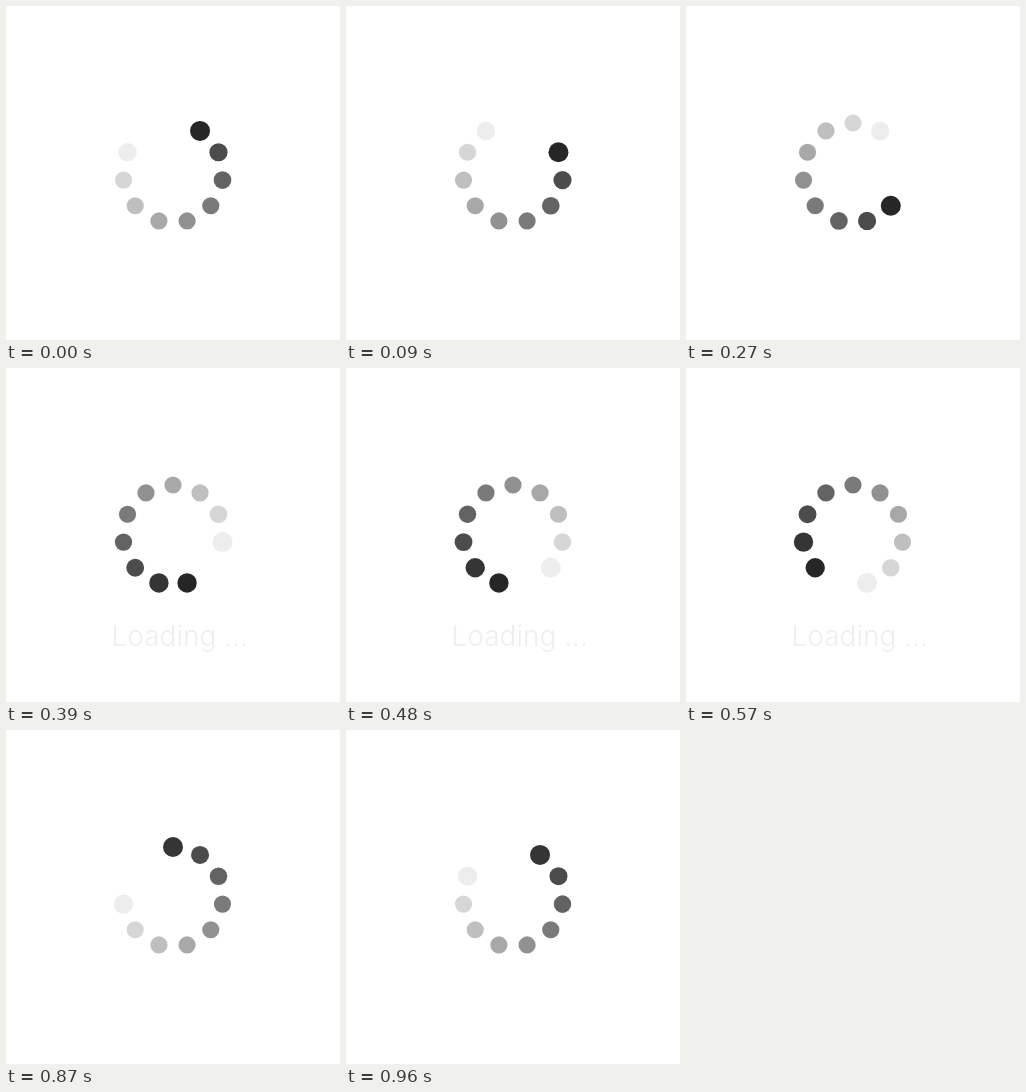
An HTML page with a canvas for the animation above (990 ms loop, 334 px wide and 334 px high).

```html
<!DOCTYPE html>
<html lang="en">
<head>
<meta charset="utf-8">
<title>Loading</title>
<style>
  html, body { margin: 0; width: 100%; height: 100%; overflow: hidden; background: #fff; }
  canvas { display: block; }
</style>
</head>
<body>
<canvas id="stage" width="334" height="334"></canvas>
<script>
const ctx = document.getElementById('stage').getContext('2d');
const SIZE = 334, CENTER = 167, RING = 50;
const DOTS = 11, TICK = 30, TICKS_PER_DOT = 3, TICKS = DOTS * TICKS_PER_DOT;
const LABEL_ON = 330, LABEL_OFF = 840;

const gray = v => `rgb(${v},${v},${v})`;
const ramp = (x, a, b) => Math.min(1, Math.max(0, (x - a) / (b - a)));

// Ticks left until a dot vanishes: it darkens in steps on the way.
function dotShade(left) {
  return left <= TICKS_PER_DOT ? 38 : 30 + 23 * Math.floor(left / TICKS_PER_DOT);
}

// A dot enters large, shrinks, then swells again before it vanishes.
function dotRadius(left) {
  const swell = 0.5 * ramp(left, 12, 6) + 0.9 * ramp(left, 6, 4.5);
  const settle = 0.3 * ramp(left, 3, 2);
  return 8.6 + swell - settle + 1.4 * ramp(left, 25.5, 29);
}

function drawDot(k, tick) {
  const left = (TICKS_PER_DOT * k - tick + TICKS) % TICKS;
  if (left < 2 || left > 29) return;
  const angle = k / DOTS * Math.PI * 2;
  ctx.fillStyle = gray(dotShade(left));
  ctx.beginPath();
  ctx.arc(CENTER + RING * Math.sin(angle), CENTER - RING * Math.cos(angle),
          dotRadius(left), 0, Math.PI * 2);
  ctx.fill();
}

function drawLabel() {
  ctx.font = '300 28px Inter, sans-serif';
  ctx.fillStyle = gray(238);
  ctx.fillText('Loading ...', 105.5, 278);
}

const start = performance.now();

function draw() {
  const time = (performance.now() - start) % (TICKS * TICK);
  const tick = Math.floor(time / TICK);
  ctx.fillStyle = '#fff';
  ctx.fillRect(0, 0, SIZE, SIZE);
  for (let k = 0; k < DOTS; k++) drawDot(k, tick);
  if (time >= LABEL_ON && time < LABEL_OFF) drawLabel();
  requestAnimationFrame(draw);
}
draw();
</script>
</body>
</html>
```
